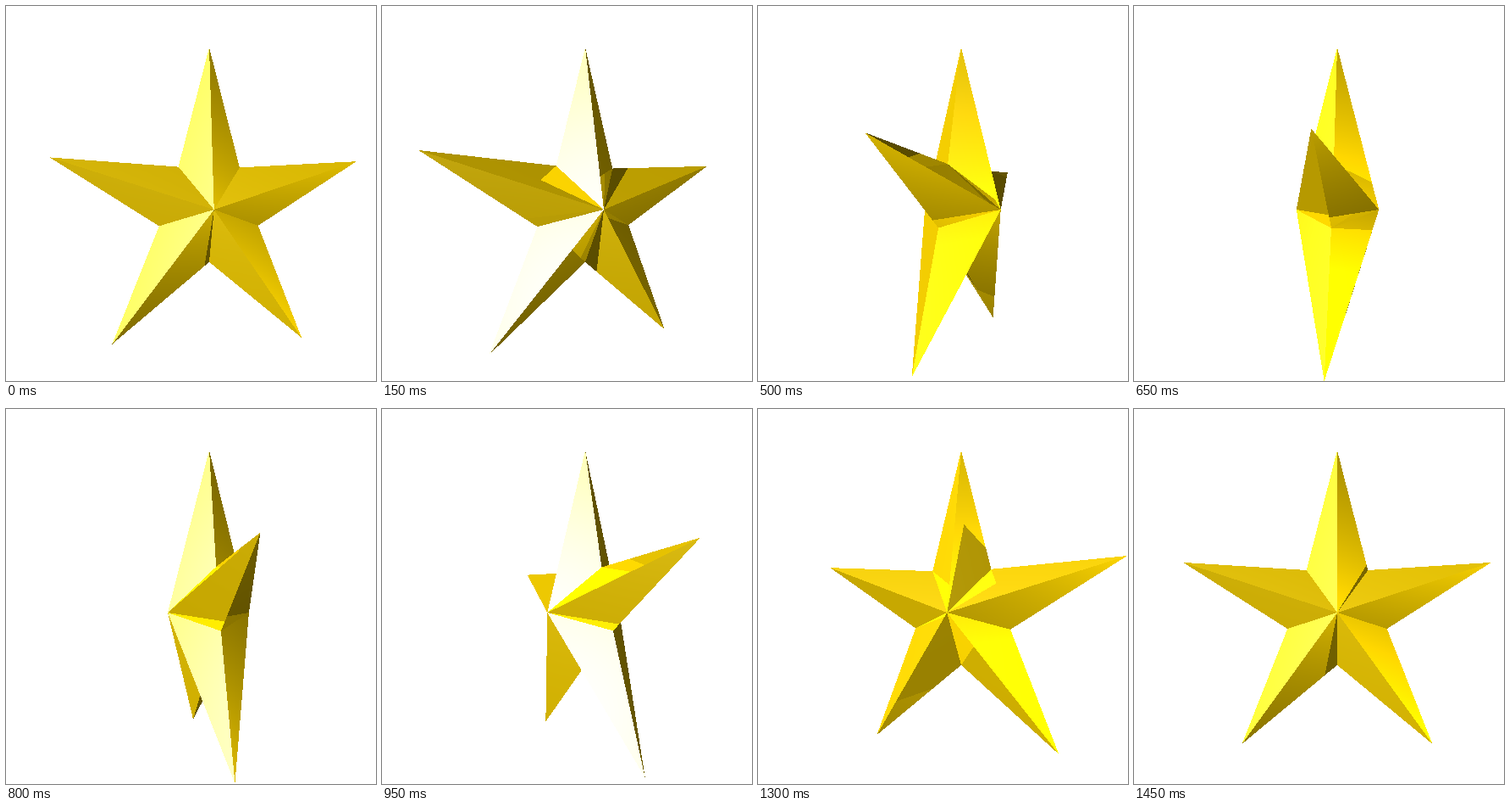
An HTML page with a canvas that plays this animation: 437x442 px, repeating every 1500 ms.

```html
<!DOCTYPE html>
<html lang="en">
<head>
<meta charset="utf-8">
<title>Turning gold star</title>
<style>
html, body { margin: 0; width: 100%; height: 100%; overflow: hidden; background: #fff; }
canvas { display: block; }
</style>
</head>
<body>
<canvas id="stage" width="437" height="442"></canvas>
<script>
const W = 437, H = 442, CENTER = 240;
const OUTER = 191.3, INNER = 61.8, APEX = 49, EYE = 475;
const STEPS = 30, STEP_MS = 50;

// Gold metal: steady glow, diffuse light, broad highlights and a weak mirror.
const GOLD = [1, .843, 0], WHITE = [1, 1, 1];
const AMBIENT = .35, SHINE = 10, MIRROR = .28;
const LIGHTS = [
  { dir: unit([-.59, -.25, .77]), diffuse: .7, gloss: 1, tint: WHITE },
  { dir: unit([.95, .23, .22]), diffuse: 0, gloss: 1.1, tint: GOLD }
];

function unit(a) { const l = Math.hypot(a[0], a[1], a[2]); return [a[0] / l, a[1] / l, a[2] / l]; }
function sub(a, b) { return [a[0] - b[0], a[1] - b[1], a[2] - b[2]]; }
function dot(a, b) { return a[0] * b[0] + a[1] * b[1] + a[2] * b[2]; }
function cross(a, b) { return [a[1] * b[2] - a[2] * b[1], a[2] * b[0] - a[0] * b[2], a[0] * b[1] - a[1] * b[0]]; }
function along(o, d, t) { return [o[0] + d[0] * t, o[1] + d[1] * t, o[2] + d[2] * t]; }

// Both halves of the star, turned about the vertical axis.
function buildStar(degrees) {
  const rad = Math.PI / 180, faces = [];
  for (const turn of [degrees * rad, (degrees - 180) * rad]) {
    const c = Math.cos(turn), s = Math.sin(turn);
    const rotate = (x, y, z) => [x * c + z * s, y, z * c - x * s];
    const rim = (radius, deg) => rotate(radius * Math.sin(deg * rad), -radius * Math.cos(deg * rad), 0);
    const apex = rotate(0, 0, APEX);
    for (let arm = 0; arm < 360; arm += 72) for (const side of [-36, 36]) {
      const tip = rim(OUTER, arm), notch = rim(INNER, arm + side);
      const u = sub(tip, apex), v = sub(notch, apex), n = unit(cross(u, v));
      const outward = dot(n, apex) < 0 ? n.map(k => -k) : n;
      faces.push({ p: [apex, tip, notch], u, v, n: outward });
    }
  }
  // Only faces that rise above a face's plane can shade it or show in it.
  for (const face of faces) {
    face.above = faces.filter(other => other.p.some(q => dot(face.n, sub(q, face.p[0])) > .01));
  }
  return faces;
}

function hitDistance(o, d, face) {
  const h = cross(d, face.v), det = dot(face.u, h);
  if (Math.abs(det) < 1e-9) return Infinity;
  const r = sub(o, face.p[0]), a = dot(r, h) / det;
  if (a < 0 || a > 1) return Infinity;
  const q = cross(r, face.u), b = dot(d, q) / det;
  if (b < 0 || a + b > 1) return Infinity;
  const t = dot(face.v, q) / det;
  return t > 1e-3 ? t : Infinity;
}

function nearest(o, d, faces) {
  let t = Infinity, face = null;
  for (const other of faces) {
    if (dot(d, other.n) >= 0) continue;
    const distance = hitDistance(o, d, other);
    if (distance < t) { t = distance; face = other; }
  }
  return face && { t, face };
}

function shade(face, point, view, mirrored) {
  const color = GOLD.map(k => k * AMBIENT);
  const add = (tint, amount) => tint.forEach((k, i) => { color[i] += k * amount; });
  for (const { dir, diffuse, gloss, tint } of LIGHTS) {
    const facing = dot(face.n, dir);
    if (facing <= 0 || nearest(point, dir, face.above)) continue;
    const half = unit(sub(dir, view));
    add(GOLD, diffuse * facing);
    add(tint, gloss * Math.max(0, dot(face.n, half)) ** SHINE);
  }
  if (mirrored) {
    const bounce = along(view, face.n, -2 * dot(view, face.n));
    const seen = nearest(point, bounce, face.above);
    if (seen) {
      const image = shade(seen.face, along(point, bounce, seen.t), bounce, false);
      add(GOLD, MIRROR * Math.min(1.2, image[0]));
    }
  }
  return color;
}

function project([x, y, z]) {
  const k = EYE / (EYE - z);
  return [x * k + CENTER, y * k + CENTER, k];
}

// Finds the frontmost face and its perspective scale for every pixel.
function rasterize(faces) {
  const depth = new Float32Array(W * H), owner = new Array(W * H).fill(null);
  const eye = [0, 0, EYE];
  for (const face of faces) {
    if (dot(face.n, sub(eye, face.p[0])) <= 0) continue;
    const [a, b, c] = face.p.map(project);
    const range = (axis, limit) => {
      const values = [a[axis], b[axis], c[axis]];
      return [Math.max(0, Math.floor(Math.min(...values))), Math.min(limit - 1, Math.ceil(Math.max(...values)))];
    };
    const [x0, x1] = range(0, W), [y0, y1] = range(1, H);
    const ux = b[0] - a[0], uy = b[1] - a[1], vx = c[0] - a[0], vy = c[1] - a[1];
    const area = ux * vy - uy * vx;
    for (let y = y0; y <= y1; y++) for (let x = x0; x <= x1; x++) {
      const dx = x + .5 - a[0], dy = y + .5 - a[1];
      const m = (dx * vy - dy * vx) / area, n = (ux * dy - uy * dx) / area;
      if (m < 0 || n < 0 || m + n > 1) continue;
      const k = a[2] + m * (b[2] - a[2]) + n * (c[2] - a[2]), i = y * W + x;
      if (k > depth[i]) { depth[i] = k; owner[i] = face; }
    }
  }
  return { depth, owner };
}

function render(step) {
  const { depth, owner } = rasterize(buildStar((step + 1) * 180 / STEPS));
  const image = new ImageData(W, H), eye = [0, 0, EYE];
  image.data.fill(255);
  owner.forEach((face, i) => {
    if (!face) return;
    const ray = [i % W + .5 - CENTER, Math.floor(i / W) + .5 - CENTER, -EYE];
    const color = shade(face, along(eye, ray, 1 / depth[i]), unit(ray), true);
    color.forEach((k, channel) => { image.data[i * 4 + channel] = 255 * k; });
  });
  return image;
}

const ctx = document.getElementById("stage").getContext("2d");
const cache = [];
let shown = -1;

function draw() {
  const step = Math.floor(performance.now() / STEP_MS) % STEPS;
  if (step !== shown) {
    cache[step] = cache[step] || render(step);
    ctx.putImageData(cache[step], 0, 0);
    shown = step;
  }
  requestAnimationFrame(draw);
}
draw();
</script>
</body>
</html>
```
